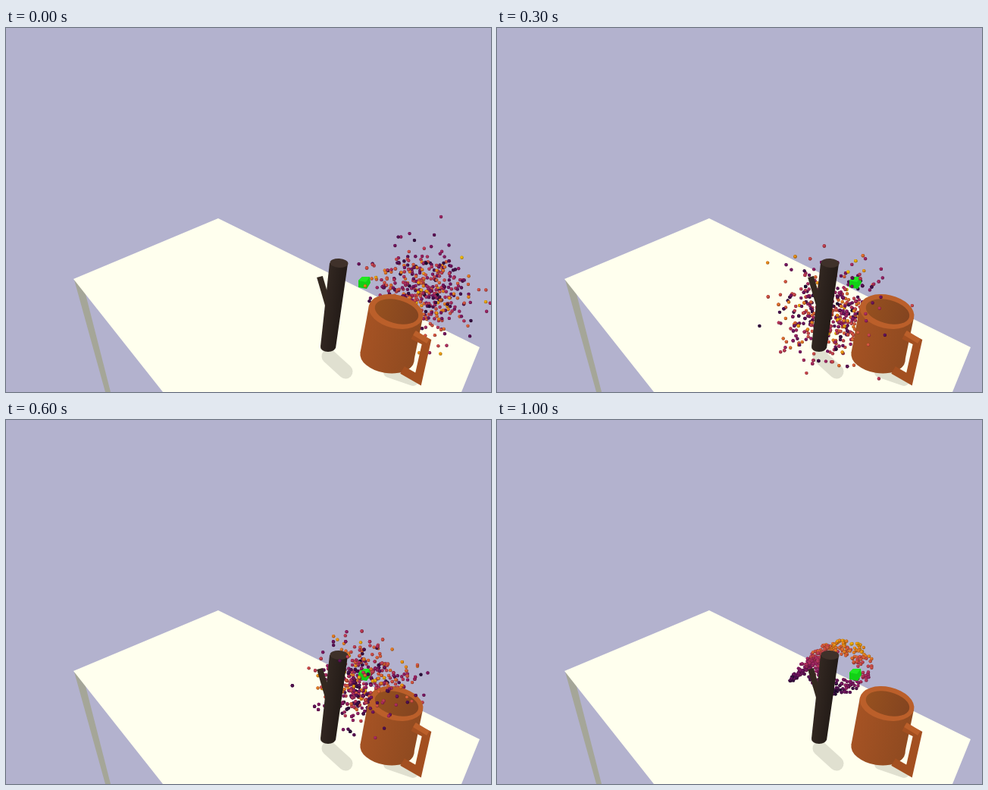
An HTML page with a canvas for the animation above (2100 ms loop, 640x480 px).

```html
<!DOCTYPE html>
<html lang="en">
<head>
<meta charset="utf-8">
<title>Particles settling</title>
<style>
html, body { margin: 0; width: 100%; height: 100%; overflow: hidden; background: #b3b2ce; }
canvas { display: block; }
</style>
</head>
<body>
<canvas id="stage" width="640" height="480"></canvas>
<script>
const ctx = document.getElementById('stage').getContext('2d');
const LOOP = 2100, STEP = 100, LAST = 10, COUNT = 500, SPREAD = 31;
const HOME = { x: 452, y: 326 };

// Turning points of the cloud's wandering centre.
const PATH = [
  { at: 0, x: 547, y: 350 },
  { at: 1, x: 548, y: 317 },
  { at: 3, x: 443, y: 377 },
  { at: 5, x: 490, y: 364 },
  { at: 7, x: 455, y: 335 },
  { at: LAST, ...HOME }
];

function randomFrom(seed) {
  return () => {
    seed = (seed + 0x6d2b79f5) | 0;
    let n = Math.imul(seed ^ (seed >>> 15), 1 | seed);
    n = (n + Math.imul(n ^ (n >>> 7), 61 | n)) ^ n;
    return ((n ^ (n >>> 14)) >>> 0) / 4294967296;
  };
}

function gauss(rand) {
  return Math.sqrt(-2 * Math.log(1 - rand())) * Math.cos(2 * Math.PI * rand());
}

const mix = (a, b, t) => a + (b - a) * t;
const clamp = v => Math.max(0, Math.min(1, v));
const smooth = t => t * t * (3 - 2 * t);

// Dark violet through magenta and orange to yellow.
function heatColor(value, light) {
  const v = clamp(value);
  const r = 24 + 215 * Math.sin(v * Math.PI / 2);
  const g = 14 + 190 * v ** 2.5;
  const b = 45 + 55 * Math.sin(v * Math.PI * 1.3);
  return `rgb(${[r, g, b].map(c => Math.round(c * light))})`;
}

// The final shape is a round shell with a tail on its left.
function makeParticle(rand) {
  let x, y;
  if (rand() < .18) {
    const along = rand();
    x = mix(388, 424, along) + 8 * (rand() - .5);
    y = mix(343, 310, along) + 14 * (rand() - .5) * (.4 + along);
  } else {
    const angle = 2 * Math.PI * rand();
    const radius = Math.sqrt(mix(.2, 1, rand()));
    x = HOME.x + 44 * radius * Math.cos(angle);
    y = HOME.y + 36 * radius * Math.sin(angle) - (x - HOME.x) * .06;
  }
  const heat = .92 - (y - 287) / 92 + (x - 450) * .003 + .06 * gauss(rand);
  return { x, y, depth: rand(), lit: heatColor(heat, 1), shade: heatColor(heat, .7) };
}

const rand = randomFrom(17);
const particles = Array.from({ length: COUNT }, () => makeParticle(rand));

function poly(fill, ...points) {
  ctx.fillStyle = fill;
  ctx.beginPath();
  for (let i = 0; i < points.length; i += 2) ctx.lineTo(points[i], points[i + 1]);
  ctx.fill();
}

function line(color, width, cap, ...points) {
  ctx.strokeStyle = color;
  ctx.lineWidth = width;
  ctx.lineCap = cap;
  ctx.beginPath();
  for (let i = 0; i < points.length; i += 2) ctx.lineTo(points[i], points[i + 1]);
  ctx.stroke();
}

function oval(fill, x, y, rx, ry = rx, turn = 0) {
  ctx.fillStyle = fill;
  ctx.beginPath();
  ctx.ellipse(x, y, rx, ry, turn, 0, 2 * Math.PI);
  ctx.fill();
}

function fade(x1, y1, x2, y2, from, to) {
  const gradient = ctx.createLinearGradient(x1, y1, x2, y2);
  gradient.addColorStop(0, from);
  gradient.addColorStop(1, to);
  return gradient;
}

function drawTable() {
  ctx.fillStyle = '#b3b2ce';
  ctx.fillRect(0, 0, 640, 480);
  poly('#a5a698', 90, 332, 104, 347, 138, 480, 131, 480);
  poly('#ffffee', 89, 331, 280, 251, 625, 421, 601, 480, 207, 480);
  line('#e0e0d0', 19, 'round', 426, 433, 448, 453);
  line('#e0e0d0', 14, 'round', 505, 454, 537, 465);
}

function drawCube() {
  poly('#12d016', 465, 333, 470, 328, 480, 328, 481, 336, 476, 344, 465, 342);
  poly('#20e822', 465, 333, 470, 328, 480, 328, 475, 335);
}

function drawMug() {
  const clay = fade(470, 400, 545, 418, '#a65324', '#8f4a20');
  oval(clay, 503, 434, 36, 21, .16);
  poly(clay, 479, 366, 550, 382, 538, 440, 467.5, 428);
  oval('#bb5f2a', 514.5, 374, 36.5, 22, .22);
  oval(fade(487, 366, 544, 382, '#96501f', '#834420'), 515.5, 374, 29.5, 15.5, .25);
  line('#a34f20', 11, 'butt', 537, 405, 555, 414, 544, 463, 523, 451);
  line('#bb5f2a', 7, 'butt', 539, 402, 557, 413);
}

function drawTrunk() {
  line('#33281f', 8, 'butt', 414, 328, 426, 369);
  const bark = fade(419, 364, 444, 367, '#332822', '#231b17');
  oval(bark, 425, 421, 10, 6);
  poly(bark, 427, 310, 451, 311, 435, 422, 415, 420);
  oval('#3f312a', 439.5, 310, 12, 6, .06);
}

function drawDots(dots) {
  for (const { x, y, lit, shade } of dots) {
    oval(shade, x, y, 2.2);
    oval(lit, x - .4, y - .4, 1.7);
  }
}

function centerAt(step) {
  const next = Math.max(1, PATH.findIndex(p => p.at >= step));
  const a = PATH[next - 1], b = PATH[next];
  const t = (step - a.at) / (b.at - a.at);
  return { x: mix(a.x, b.x, t), y: mix(a.y, b.y, t) };
}

function drawStep(step) {
  const center = centerAt(step);
  const pull = smooth(clamp((step - 4) / (LAST - 4)));
  const spread = SPREAD * Math.sqrt(1 - pull);
  const beforeMug = .3 * Math.sin(Math.PI * step / LAST);
  const beforeTrunk = beforeMug * pull / 2;
  const noise = randomFrom(901 + step * 77);
  const dots = particles.map(p => ({
    ...p,
    x: center.x + spread * gauss(noise) + pull * (p.x - HOME.x),
    y: center.y + spread * .93 * gauss(noise) + pull * (p.y - HOME.y)
  }));
  drawTable();
  drawDots(dots.filter(d => d.depth >= .5));
  drawCube();
  drawDots(dots.filter(d => d.depth < .5 * (1 - pull) || (d.depth < .5 && d.x < 462)));
  drawMug();
  drawDots(dots.filter(d => d.depth < beforeMug));
  drawTrunk();
  drawDots(dots.filter(d => d.depth < beforeTrunk));
}

let shown = -1;
function tick() {
  const step = Math.min(LAST, Math.floor(performance.now() % LOOP / STEP));
  if (step !== shown) drawStep(shown = step);
  requestAnimationFrame(tick);
}
tick();
</script>
</body>
</html>
```
